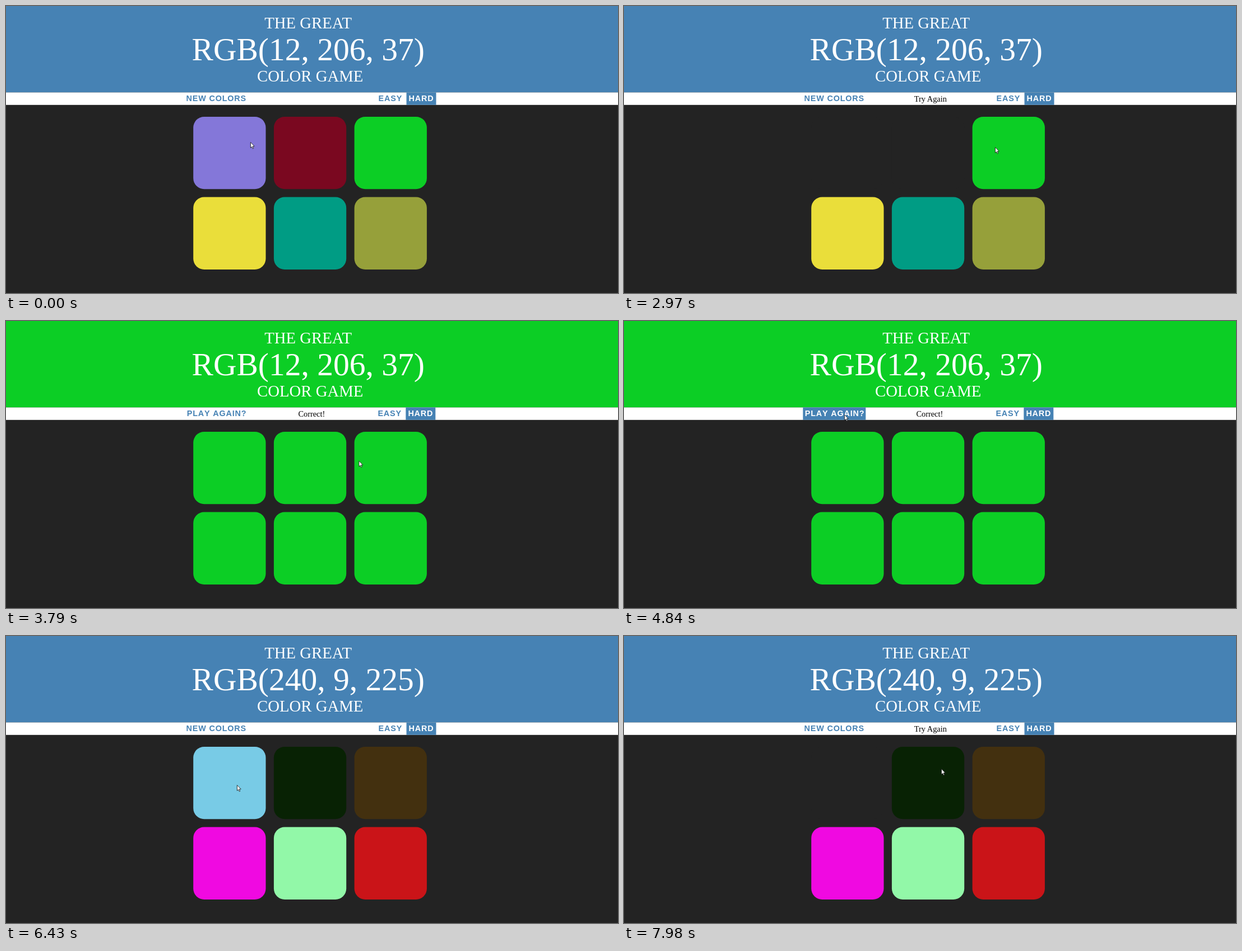
An HTML page with a canvas for the animation above (8000 ms loop, 1092x513 px).

```html
<!DOCTYPE html>
<html lang="en">
<head>
<meta charset="utf-8">
<title>Color Game</title>
<style>
  html, body { margin: 0; width: 100%; height: 100%; overflow: hidden; background: #232323; }
  canvas { display: block; width: 100vw; height: 100vh; }
</style>
</head>
<body>
<canvas id="stage" width="1092" height="513"></canvas>
<script>
const ctx = document.getElementById('stage').getContext('2d');
const LOOP = 8000;
const BG = [35, 35, 35], BLUE = [70, 130, 180], WHITE = [255, 255, 255], GREEN = [12, 206, 37];
const SERIF = '"Liberation Serif", "Times New Roman", serif';
const SANS = '"Liberation Sans", Arial, sans-serif';

const BURSTS = [
  [310, 1100, 7], [2120, 2390, 3], [2670, 2970, 3], [3370, 4330, 8],
  [4450, 4840, 4], [5550, 6430, 7], [6710, 7680, 8], [7830, 7980, 2]
];

const ROUND_1 = [[132, 119, 217], [122, 8, 32], GREEN, [234, 222, 58], [0, 156, 132], [150, 160, 58]];
const ROUND_2 = [[120, 203, 230], [8, 34, 4], [67, 48, 15], [240, 9, 225], [146, 248, 168], [202, 20, 24]];

const WON = 3370, RESET = 5535;
const HOVER_IN = 4480, HOVER_OUT = 6020;
const SQUARE_FADE = 380, BUTTON_FADE = 190;

// Each click recolours some squares
const CLICKS = [
  { at: 290, colors: [BG] },
  { at: 2085, colors: [, BG] },
  { at: WON, colors: Array(6).fill(GREEN) },
  { at: RESET, colors: ROUND_2 },
  { at: 6690, colors: [BG] }
];

// Pointer: time, x, y
const PATH = [
  [0, 436, 243], [620, 436, 243], [1100, 535, 246], [2560, 535, 246],
  [2970, 662, 252], [3300, 662, 252], [3450, 662, 261], [3510, 662, 261],
  [4760, 393, 167], [5850, 393, 167], [6430, 412, 266], [6960, 412, 266],
  [7480, 574, 240], [7680, 562, 238], [7700, 562, 238], [7980, 566, 237]
];

const clamp = v => Math.max(0, Math.min(1, v));
const smooth = u => u * u * (3 - 2 * u);
const mix = (a, b, k) => a.map((v, i) => v + (b[i] - v) * k);
const rgb = c => `rgb(${c.map(Math.round).join(', ')})`;

// CSS "ease": cubic-bezier(.25, .1, .25, 1)
function ease(x) {
  if (x <= 0 || x >= 1) return clamp(x);
  let lo = 0, hi = 1, s = 0.5;
  for (let i = 0; i < 20; i++) {
    s = (lo + hi) / 2;
    if (0.75 * s * (1 - s) + s ** 3 < x) lo = s; else hi = s;
  }
  return 0.3 * s * (1 - s) ** 2 + 3 * s * s * (1 - s) + s ** 3;
}

function captureTime(t) {
  let held = 0;
  for (const [start, end, steps] of BURSTS) {
    if (t < start) break;
    const dt = (end - start) / (steps - 1);
    held = Math.min(end, start + Math.floor((t - start) / dt + 1e-6) * dt);
  }
  return held;
}

function squareColor(i, t) {
  return CLICKS.reduce((color, { at, colors }) =>
    colors[i] && t >= at ? mix(color, colors[i], ease((t - at) / SQUARE_FADE)) : color, ROUND_1[i]);
}

function pointerAt(t) {
  const n = PATH.findIndex(p => p[0] > t);
  if (n < 0) return PATH[PATH.length - 1].slice(1);
  const [t0, ...from] = PATH[n - 1], [t1, ...to] = PATH[n];
  return mix(from, to, smooth((t - t0) / (t1 - t0)));
}

function rect(x, y, w, h, color) {
  ctx.fillStyle = rgb(color);
  ctx.fillRect(x, y, w, h);
}

function text(str, x, y, font, color, align = 'center', spacing = 0) {
  ctx.font = font;
  ctx.textAlign = align;
  ctx.letterSpacing = spacing + 'px';
  ctx.fontKerning = spacing ? 'none' : 'normal';
  ctx.fillStyle = rgb(color);
  ctx.fillText(str, x, y);
}

// lit: 0 = blue on white, 1 = white on blue
function button(label, x, left, width, lit) {
  if (lit > 0) rect(left, 154.5, width, 22.3, mix(WHITE, BLUE, lit));
  text(label, x, 170.4, `bold 14.36px ${SANS}`, mix(BLUE, WHITE, lit), 'left', 0.85);
}

function drawHeader(t, won) {
  rect(0, 0, 1092, 154.5, won ? GREEN : BLUE);
  text('THE GREAT', 539.1, 39.7, `28.75px ${SERIF}`, WHITE);
  text(t < RESET ? 'RGB(12, 206, 37)' : 'RGB(240, 9, 225)', 539.2, 97, `57.5px ${SERIF}`, WHITE);
  text('COLOR GAME', 542.7, 134.6, `28.75px ${SERIF}`, WHITE);
}

function drawBar(t, won) {
  rect(0, 154.5, 1092, 22.3, WHITE);
  const lit = ease((t - HOVER_IN) / BUTTON_FADE) - ease((t - HOVER_OUT) / BUTTON_FADE);
  const shift = won ? -1.2 : 0;
  if (won) button('PLAY AGAIN?', 322.7, 319.3, 112, lit);
  else button('NEW COLORS', 321.6, 317.8, 114.6, lit);
  button('EASY', 664.6 + shift, 0, 0, 0);
  button('HARD', 718.6 + shift, 714.5 + shift, 53, 1);

  const tried = (t >= CLICKS[0].at && t < WON) || t >= CLICKS[4].at;
  const message = won ? 'Correct!' : tried ? 'Try Again' : '';
  text(message, won ? 545.3 : 546.8, 170.5, `14.36px ${SERIF}`, [0, 0, 0]);
}

function drawSquares(t) {
  for (let i = 0; i < 6; i++) {
    ctx.fillStyle = rgb(squareColor(i, t));
    ctx.beginPath();
    ctx.roundRect(334.2 + (i % 3) * 143.7, 197.9 + Math.floor(i / 3) * 143.7, 129.3, 129.3, 19.4);
    ctx.fill();
  }
}

function drawPointer(t) {
  const [x, y] = pointerAt(t);
  ctx.save();
  ctx.translate(x + 0.4, y + 0.6);
  ctx.scale(0.62, 0.62);
  ctx.beginPath();
  for (const [px, py] of [[0, 0], [0, 16], [3.7, 12.6], [6.2, 18.4], [8.6, 17.3], [6.2, 11.6], [11, 11.4]]) {
    ctx.lineTo(px, py);
  }
  ctx.closePath();
  ctx.fillStyle = '#fff';
  ctx.strokeStyle = '#111';
  ctx.lineWidth = 1.3;
  ctx.fill();
  ctx.stroke();
  ctx.restore();
}

function draw(time) {
  const t = captureTime(time % LOOP);
  const won = t >= WON && t < RESET;
  rect(0, 0, 1092, 513, BG);
  drawHeader(t, won);
  drawBar(t, won);
  drawSquares(t);
  drawPointer(t);
}

const begin = performance.now();
function tick() {
  draw(performance.now() - begin);
  requestAnimationFrame(tick);
}
tick();
</script>
</body>
</html>
```
